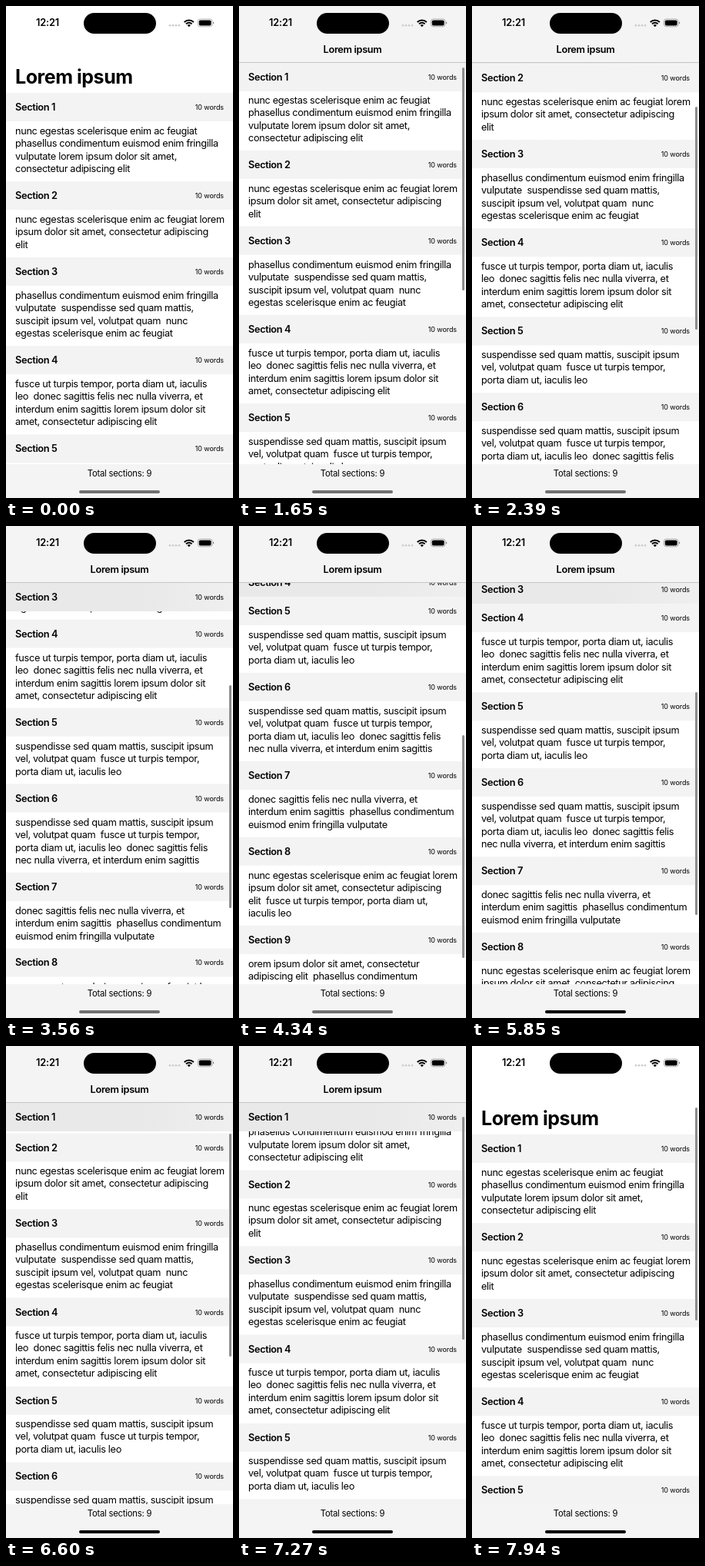
Recreate the animation shown at these times as an HTML page. Size 295 by 640 pixels, loop 8000 ms.

```html
<!DOCTYPE html>
<html lang="en">
<head>
<meta charset="utf-8">
<title>Sticky sections</title>
<style>
  html, body { margin: 0; width: 100%; height: 100%; overflow: hidden; background: #fff; }
  #stage {
    position: relative; width: 295px; height: 640px; overflow: hidden; background: #fff; color: #000;
    font: 12.76px/16.5px Inter, Roboto, sans-serif; letter-spacing: -0.027em;
  }
  #stage div, #stage svg { position: absolute; }
  .row { left: 12px; white-space: pre; }
  .head { left: 0; top: 0; width: 295px; height: 37px; line-height: 37px; font-weight: 600; }
  .head b { position: absolute; left: 12px; font-weight: 600; }
  .head span { position: absolute; right: 12px; font-size: 9px; font-weight: 400; letter-spacing: -0.01em; }
  #large { left: 12px; top: 76.5px; font-size: 25px; line-height: 31px; font-weight: 700; letter-spacing: -0.018em; white-space: nowrap; }
  #nav { left: 0; top: 0; width: 295px; height: 74px; }
  #line { left: 0; top: 73px; width: 295px; height: 1px; background: #c6c6c6; }
  #title { left: 0; top: 49px; width: 295px; text-align: center; font-weight: 600; }
  #clock { left: 14px; top: 14px; width: 80px; text-align: center; font-weight: 600; letter-spacing: -0.01em; }
  #island { left: 100.5px; top: 8.5px; width: 94px; height: 27.5px; border-radius: 14px; background: #000; }
  #thumb { left: 290.2px; width: 2.4px; border-radius: 2px; background: #8c8c8c; }
  #bar { left: 0; top: 596px; width: 295px; height: 44px; background: #f4f4f4; }
  #total { left: 0; top: 4px; width: 295px; text-align: center; font-size: 11.25px; letter-spacing: -0.02em; }
  #home { left: 95px; top: 34.2px; width: 105px; height: 3.8px; border-radius: 2px; }
</style>
</head>
<body>
<div id="stage">
  <div id="rows"></div>
  <div id="heads"></div>
  <div id="thumb"></div>
  <div id="nav">
    <div id="line"></div>
    <div id="title">Lorem ipsum</div>
    <div id="clock">12:21</div>
    <div id="island"></div>
    <svg width="295" height="44" fill="none">
      <g fill="#c9c9c9">
        <circle cx="213" cy="25.3" r="1.3"/><circle cx="217" cy="25.3" r="1.3"/>
        <circle cx="221" cy="25.3" r="1.3"/><circle cx="225" cy="25.3" r="1.3"/>
      </g>
      <g stroke="#000" stroke-width="2">
        <path d="M231.7 21a8.7 8.7 0 0 1 12.2 0"/>
        <path d="M234 23.4a5.4 5.4 0 0 1 7.6 0"/>
      </g>
      <path d="M237.8 27.3l-2.2-2.3a3.1 3.1 0 0 1 4.4 0z" fill="#000"/>
      <rect x="249.4" y="17" width="18.6" height="9.8" rx="3.1" stroke="#000" stroke-opacity=".38" stroke-width=".8"/>
      <rect x="250.8" y="18.4" width="15.8" height="7" rx="1.9" fill="#000"/>
      <path d="M269 20.3q1.3.5 1.3 1.6t-1.3 1.6z" fill="#000" fill-opacity=".42"/>
    </svg>
  </div>
  <div id="large">Lorem ipsum</div>
  <div id="bar"><div id="total">Total sections: 9</div><div id="home"></div></div>
</div>
<script>
const LOOP = 8000, NAV = 74, LIST_TOP = 113, HEAD = 37, LINE = 16.5, PADDING = 12.2, PADDING_TOP = 4.6;

const texts = [
`nunc egestas scelerisque enim ac feugiat
phasellus condimentum euismod enim fringilla
vulputate lorem ipsum dolor sit amet,
consectetur adipiscing elit`,
`nunc egestas scelerisque enim ac feugiat lorem
ipsum dolor sit amet, consectetur adipiscing
elit`,
`phasellus condimentum euismod enim fringilla
vulputate  suspendisse sed quam mattis,
suscipit ipsum vel, volutpat quam  nunc
egestas scelerisque enim ac feugiat`,
`fusce ut turpis tempor, porta diam ut, iaculis
leo  donec sagittis felis nec nulla viverra, et
interdum enim sagittis lorem ipsum dolor sit
amet, consectetur adipiscing elit`,
`suspendisse sed quam mattis, suscipit ipsum
vel, volutpat quam  fusce ut turpis tempor,
porta diam ut, iaculis leo`,
`suspendisse sed quam mattis, suscipit ipsum
vel, volutpat quam  fusce ut turpis tempor,
porta diam ut, iaculis leo  donec sagittis felis
nec nulla viverra, et interdum enim sagittis`,
`donec sagittis felis nec nulla viverra, et
interdum enim sagittis  phasellus condimentum
euismod enim fringilla vulputate`,
`nunc egestas scelerisque enim ac feugiat lorem
ipsum dolor sit amet, consectetur adipiscing
elit  fusce ut turpis tempor, porta diam ut,
iaculis leo`,
`orem ipsum dolor sit amet, consectetur
adipiscing elit  phasellus condimentum
euismod enim fringilla vulputate
suspendisse sed quam mattis, suscipit
ipsum vel, volutpat quam`];

const $ = id => document.getElementById(id);
const clamp = (x, lo = 0, hi = 1) => Math.min(hi, Math.max(lo, x));
const grey = v => `rgb(${v},${v},${v})`;

function add(parent, className, html) {
  const el = document.createElement('div');
  el.className = className;
  el.innerHTML = html;
  return parent.appendChild(el);
}

let end = LIST_TOP;
const sections = texts.map((text, i) => {
  const top = end;
  const head = add($('heads'), 'head', `<b>Section ${i + 1}</b><span>10 words</span>`);
  add($('rows'), 'row', text).style.top = top + HEAD + PADDING_TOP + 'px';
  end += HEAD + PADDING + LINE * text.split('\n').length;
  return { top, end, head };
});

// Each flick: start, stop (ms), dragged distance, glide distance.
const flicks = [
  [1410, 2400, 40, 146],
  [2400, 3400, 45, 154],
  [3530, 5110, 45, 149],
  [5600, 7300, -155, -298],
  [7300, 8000, -45, -150]
];
const DRAG_TIME = 0.24, BOUNCE_START = 7612;

function travel(sec, drag, glide) {
  if (sec < DRAG_TIME) return drag * (sec / DRAG_TIME) ** (2 * glide * DRAG_TIME / drag);
  return drag + glide * (1 - Math.exp(-2 * (sec - DRAG_TIME)));
}

function scrollAt(t) {
  if (t > BOUNCE_START) {
    const sec = (t - BOUNCE_START) / 1000;
    return -260 * sec * Math.exp(-11.3 * sec);
  }
  return flicks.reduce((sum, [start, stop, drag, glide]) =>
    sum + travel((clamp(t, start, stop) - start) / 1000, drag, glide), 0);
}

function render(t) {
  const s = scrollAt(t);
  $('rows').style.transform = `translateY(${-s}px)`;

  for (const { top, end, head } of sections) {
    const y = Math.max(top - s, Math.min(NAV, end - s - HEAD));
    const pinned = clamp((NAV - top + s) / 20);
    head.style.transform = `translateY(${y}px)`;
    head.style.background =
      `linear-gradient(90deg, ${grey(243 - 10 * pinned)} 60%, ${grey(243 - 4 * pinned)})`;
  }

  const collapsed = clamp((s - 34) / 6);
  $('nav').style.background = grey(255 - 11 * collapsed);
  $('line').style.opacity = collapsed;
  $('title').style.opacity = clamp((s - 26) / 10);
  $('large').style.transform = `translateY(${-s}px)`;
  $('large').style.clipPath = `inset(${clamp(s - 2, 0, 31)}px 0 0 0)`;

  const thumb = $('thumb').style;
  thumb.top = Math.max(80, 61.8 + 0.452 * s) + 'px';
  thumb.height = 290 - clamp((39 - s) * 0.31, 0, 13) + 'px';
  thumb.opacity = clamp((t - 1430) / 80);

  $('home').style.background = grey(112 * (1 - clamp((t - 5640) / 160)));
}

const began = performance.now();
function tick() {
  render((performance.now() - began) % LOOP);
  requestAnimationFrame(tick);
}
tick();
</script>
</body>
</html>
```
